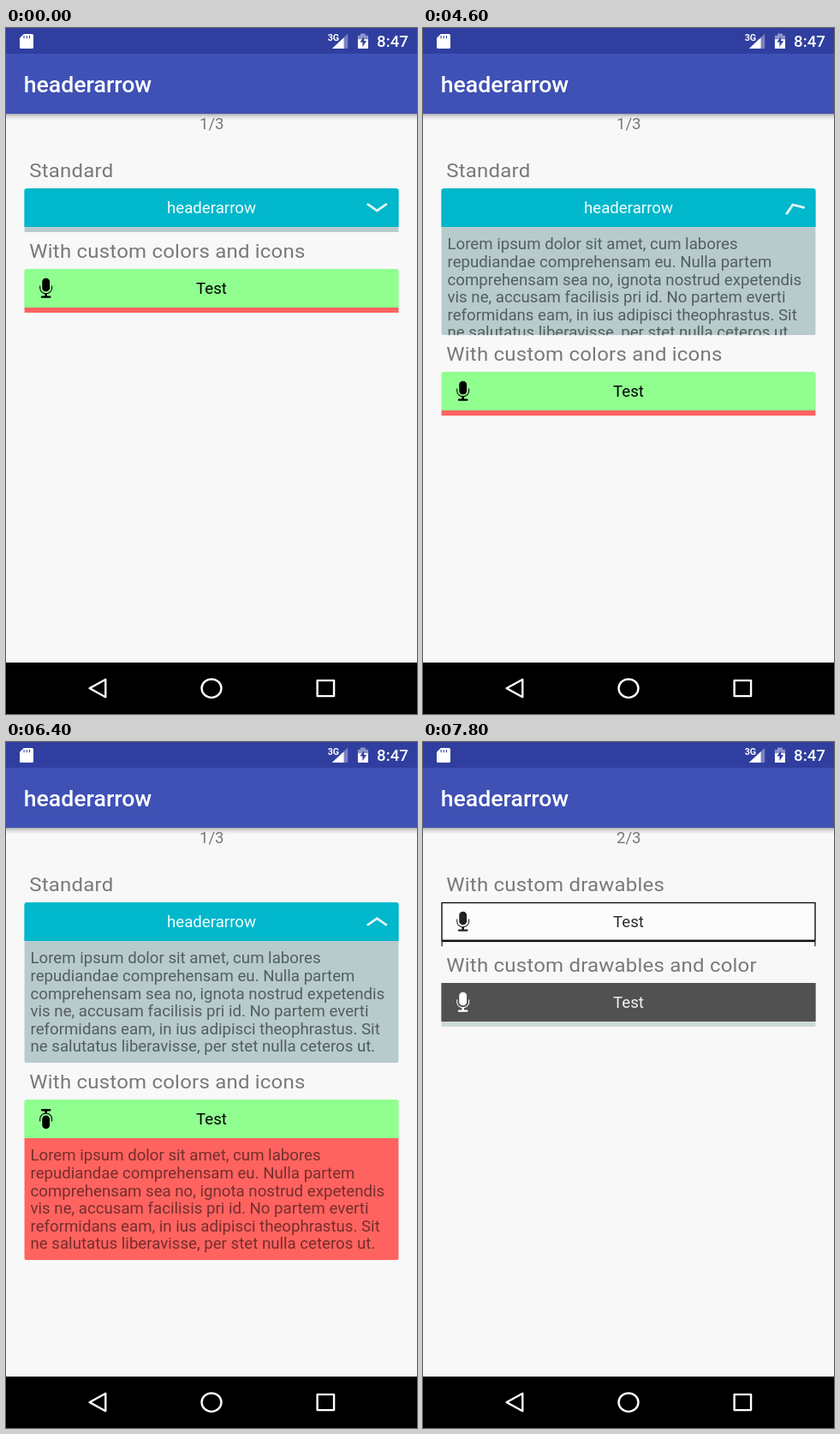
An HTML page for the animation above (8 s loop, 480 by 800 pixels).

```html
<!DOCTYPE html>
<html lang="en">
<head>
<meta charset="utf-8">
<title>headerarrow</title>
<style>
  html, body { margin: 0; width: 100%; height: 100%; overflow: hidden; background: #f8f8f8; }
  #stage { display: block; width: 100%; height: 100%; }
  text { font: 14px Roboto, sans-serif; white-space: pre; }
  .mid { text-anchor: middle; }
  .label { font-size: 18px; letter-spacing: .16px; fill: #797979; }
</style>
</head>
<body>
<!-- Units are dp on a 360 x 640 screen, shown a little wider than tall. -->
<svg id="stage" viewBox="0 0 360 640" preserveAspectRatio="none">
  <defs>
    <linearGradient id="shade" x1="0" y1="0" x2="0" y2="1">
      <stop offset="0" stop-color="#000" stop-opacity=".32"/>
      <stop offset=".4" stop-color="#000" stop-opacity=".12"/>
      <stop offset="1" stop-color="#000" stop-opacity="0"/>
    </linearGradient>
    <g id="mic">
      <rect x="-3.3" y="-9.3" width="6.6" height="12.4" rx="3.2" stroke="none"/>
      <path d="M-5.2-2.4v2.3a5.2 5.2 0 0 0 10.4 0v-2.3" fill="none" stroke-width=".8"/>
      <path d="M0 5v3" stroke-width="2"/>
      <rect x="-4.4" y="7.2" width="8.8" height="1.9" rx=".9" stroke="none"/>
    </g>
    <path id="chevron" d="M-8.6-3.5L0 2.9L8.6-3.5" fill="none" stroke="#dff5f7" stroke-width="2.2"/>
  </defs>

  <rect width="360" height="640" fill="#f8f8f8"/>
  <g id="page1"></g>
  <g id="page2"></g>
  <text id="count" class="mid" x="180.2" y="94.8" fill="#797979"></text>

  <rect y="80" width="360" height="6" fill="url(#shade)"/>
  <rect width="360" height="24" fill="#303f9f"/>
  <rect y="24" width="360" height="56" fill="#3f51b5"/>
  <text x="15.5" y="59.8" fill="#fff" style="font-size:20px;font-weight:500">headerarrow</text>

  <g fill="#fff">
    <path d="M15.6 5.6h7.2q1.2 0 1.2 1.2v11.2q0 1.2-1.2 1.2h-9.6q-1.2 0-1.2-1.2v-8.6z"/>
    <path d="M15.8 7.2v2.6M18.2 7.2v2.6M20.6 7.2v2.6" stroke="#303f9f" stroke-width=".8"/>
    <path d="M285.6 19.2h13.8v-13.8z" opacity=".35"/>
    <path d="M285.6 19.2h10.3v-10.2z"/>
    <text x="281.8" y="12.2" style="font-size:8px;font-weight:700">3G</text>
    <path d="M308.2 10.5v-3.6h2.3v-1.7h4.4v1.7h2.3v3.6z" opacity=".45"/>
    <path d="M308.2 10.5h9v8.7h-9z"/>
    <path d="M313.6 8l-3.6 5.2h2.3v4.3l3.5-5.6h-2.2z" fill="#303f9f"/>
    <text x="352.4" y="17.3" text-anchor="end" style="font-weight:500">8:47</text>
  </g>

  <rect y="592" width="360" height="48"/>
  <g fill="none" stroke="#fff" stroke-width="1.8" stroke-linejoin="round">
    <path d="M73.2 616l14-8.2v16.4z"/>
    <circle cx="180" cy="616" r="8.6"/>
    <rect x="272.7" y="608.7" width="14.6" height="14.6"/>
  </g>
</svg>
<script>
const $ = id => document.getElementById(id);
const LOOP = 8000, STEP = 100;
const TOP = 149.5, GAP = 75.2, HEAD = 36, SHUT = 5, GROW = 108.8;

const lorem = [
  'Lorem ipsum dolor sit amet, cum labores',
  'repudiandae comprehensam eu. Nulla partem',
  'comprehensam sea no, ignota nostrud expetendis',
  'vis ne, accusam facilisis pri id. No partem everti',
  'reformidans eam, in ius adipisci theophrastus. Sit',
  'ne salutatus liberavisse, per stet nulla ceteros ut.'
].map((line, i) => `<text x="5.4" y="${21.2 + 16.5 * i}" fill-opacity=".54">${line}</text>`).join('');

const icon = (name, x, color) =>
  `<g class="icon" data-x="${x}" transform="translate(${x} 18)" fill="${color}" stroke="${color}"><use href="#${name}"/></g>`;

function addPanel(page, row, o) {
  const g = document.createElementNS('http://www.w3.org/2000/svg', 'g');
  const frame = h => `<rect x=".5" y=".5" width="327" height="${h}" fill="#fcfcfc" stroke="#000"/>`;
  const head = o.border ? frame(35)
    : `<path d="M0 36V${o.r}q0-${o.r} ${o.r}-${o.r}H${328 - o.r}q${o.r} 0 ${o.r} ${o.r}V36z" fill="${o.head}"/>`;
  const back = o.border ? frame(113)
    : `<rect class="back" y="-6" width="328" height="${SHUT + 6}" fill="${o.body}"/>`;
  g.innerHTML = `<text class="label" x="4.5" y="-10">${o.label}</text>` +
    `<svg class="body" y="${HEAD}" width="328" height="${SHUT}" overflow="hidden">${back}${lorem}</svg>` +
    head + `<text class="mid" x="164" y="23.5" fill="${o.ink}">${o.text}</text>` + o.icon;
  g.setAttribute('transform', `translate(16 ${TOP + GAP * row})`);
  $(page).append(g);
  return g;
}

const first = addPanel('page1', 0, { label: 'Standard', text: 'headerarrow', r: 2.4,
  head: '#00b7cb', body: '#b7cbcc', ink: '#f4feff', icon: icon('chevron', 309, 'none') });
const second = addPanel('page1', 1, { label: 'With custom colors and icons', text: 'Test', r: 2.4,
  head: '#90ff90', body: '#ff6360', ink: '#000', icon: icon('mic', 19, '#000') });
addPanel('page2', 0, { label: 'With custom drawables', text: 'Test', border: true,
  ink: '#2c2c2c', icon: icon('mic', 19, '#222') });
addPanel('page2', 1, { label: 'With custom drawables and color', text: 'Test', r: 0,
  head: '#515151', body: '#cbdad7', ink: '#f4f4f4', icon: icon('mic', 19, '#fff') });

const clamp = u => Math.min(1, Math.max(0, u));
const ease = (t, start, span) => (1 - Math.cos(Math.PI * clamp((t - start) / span))) / 2;

function open(panel, p) {
  const h = SHUT + GROW * p, back = panel.querySelector('.back'), mark = panel.querySelector('.icon');
  panel.querySelector('.body').setAttribute('height', h);
  back.setAttribute('height', h + 6);
  back.setAttribute('rx', 2.4 * p);
  mark.setAttribute('transform', `translate(${mark.dataset.x} 18) rotate(${180 * p})`);
}

// Finger drag followed by the pager settling, one value per step.
const swipe = [0, 8, 36, 110, 195, 268.5, 315, 343, 355, 360];
function scroll(t) {
  const u = clamp((t - 6500) / 900) * 9, i = Math.min(8, Math.floor(u));
  return swipe[i] + (swipe[i + 1] - swipe[i]) * (u - i);
}

function draw(t) {
  const p = ease(t, 4250, 450), x = scroll(t);
  open(first, p);
  open(second, ease(t, 5610, 420));
  second.setAttribute('transform', `translate(16 ${TOP + GAP + GROW * p})`);
  $('page1').setAttribute('transform', `translate(${-x} 0)`);
  $('page2').setAttribute('transform', `translate(${360 - x} 0)`);
  $('count').textContent = t < 6900 ? '1/3' : '2/3';
}

const begin = performance.now();
function tick() {
  const t = (performance.now() - begin) % LOOP;
  draw(Math.floor(t / STEP) * STEP);
  requestAnimationFrame(tick);
}
tick();
</script>
</body>
</html>
```
